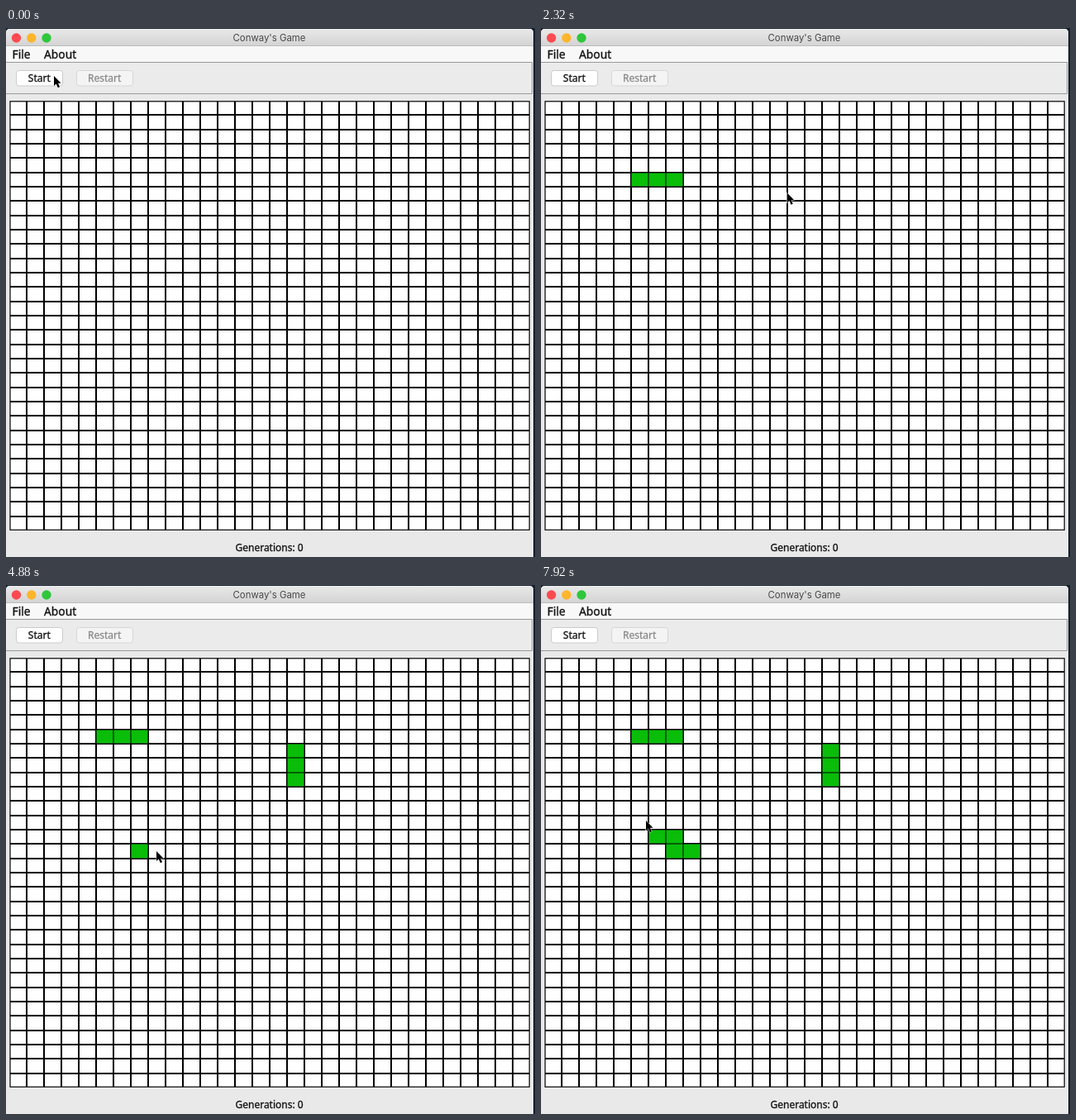
Write an HTML page that moves like this. It is 640 px wide and 640 px high and loops after 8000 ms.

```html
<!DOCTYPE html>
<html lang="en">
<head>
<meta charset="utf-8">
<title>Conway's Game</title>
<style>
html, body { margin: 0; width: 100%; height: 100%; overflow: hidden; background: #e9e9e9; }
svg { display: block; width: 100%; height: 100%; }
text { font: 500 12px "Noto Sans", "Open Sans", sans-serif; fill: #111; stroke: #111; stroke-width: 0.3px; }
.title { font: 400 11.4px Inter, Roboto, sans-serif; fill: #484848; stroke: none; text-anchor: middle; }
.menu { font-size: 13.8px; }
.disabled { fill: #8b8b8b; stroke: #8b8b8b; }
.middle { text-anchor: middle; }
</style>
</head>
<body>
<svg viewBox="0 0 640 640">
  <defs>
    <linearGradient id="bar" x2="0" y2="1">
      <stop stop-color="#e9e9e9"/><stop offset="1" stop-color="#d3d3d3"/>
    </linearGradient>
  </defs>
  <rect width="640" height="640" fill="#17202f"/>
  <path d="M0 640V6Q0 1 5 1H633Q638 1 638 6V640Z" fill="#e9e9e9"/>
  <path d="M0 22V6Q0 1 5 1H633Q638 1 638 6V22Z" fill="url(#bar)"/>
  <rect y="21" width="638" height="1" fill="#bdbdbd"/>
  <circle cx="12.5" cy="12" r="5.7" fill="#fc4b50"/>
  <circle cx="30.8" cy="12" r="5.7" fill="#fdb52c"/>
  <circle cx="49" cy="12" r="5.7" fill="#2fc63c"/>
  <text class="title" x="318.5" y="16.3">Conway's Game</text>

  <rect y="22" width="638" height="19" fill="#f8f8f8"/>
  <text class="menu" x="7.5" y="36.7">File</text>
  <text class="menu" x="46" y="36.7">About</text>

  <path d="M0 41.5H636.5V79.5H0" fill="#ebebeb" stroke="#999"/>
  <rect x="12.5" y="51.5" width="56" height="18.5" rx="3" fill="#fff" stroke="#cbcbcb"/>
  <text class="middle" x="40.3" y="65">Start</text>
  <rect x="85.5" y="51.5" width="68" height="18.5" rx="3" fill="#f4f4f4" stroke="#d6d6d6"/>
  <text class="middle disabled" x="119.2" y="65">Restart</text>

  <rect x="5" y="89" width="628" height="518" fill="#fff"/>
  <path id="grid" stroke="#000" stroke-width="2"/>
  <rect x="5" y="88.8" width="628.2" height="518.4" fill="none" stroke="#000" stroke-width="1.2"/>
  <g id="cells" fill="#09bd09"></g>
  <text class="middle" x="318.6" y="633">Generations: 0</text>
  <path id="cursor" d="M0 0V12L2.7 9.5L4.8 14.2L7 13.2L5 8.7H8.6Z"
        fill="#000" stroke="#fff" stroke-width="1" paint-order="stroke"/>
</svg>
<script>
const LOOP = 8000, STEP = 80, COUNT = 30, HOP = 160;
const lineX = i => 4 + 21 * i;
const lineY = i => Math.round(88 + 52 / 3 * i);

// Runs of clicked cells, each starting at a time and cell and going on in one direction
const runs = [
  { start: 1040, gap: 400, col: 5, row: 5, dx: 1, dy: 0, count: 3 },
  { start: 2880, gap: 160, col: 16, row: 6, dx: 0, dy: 1, count: 3 },
  { start: 4720, gap: 320, col: 7, row: 13, dx: 1, dy: 0, count: 2 },
  { start: 5440, gap: 320, col: 7, row: 12, dx: -1, dy: 0, count: 2 }
];

// Pointer stops away from clicks
const stops = [
  { time: 0, x: 58, y: 58 },
  { time: 240, x: 58, y: 58 },
  { time: 2640, x: 372, y: 208 },
  { time: 3440, x: 355, y: 260 },
  { time: 3760, x: 290, y: 342 },
  { time: 4240, x: 76, y: 284 },
  { time: 6400, x: 140, y: 305 },
  { time: 6800, x: 127, y: 285 },
  { time: LOOP, x: 127, y: 285 }
];

let gridPath = "";
for (let i = 1; i < COUNT; i++) {
  gridPath += `M${lineX(i)} 89V607M5 ${lineY(i)}H633`;
}
document.getElementById("grid").setAttribute("d", gridPath);

const cellGroup = document.getElementById("cells");
const cells = [];
function addCell(time, col, row) {
  const rect = document.createElementNS("http://www.w3.org/2000/svg", "rect");
  const x = lineX(col) + 0.5, y = lineY(row) + 0.5;
  const box = { x, y, width: lineX(col + 1) - x - 0.5, height: lineY(row + 1) - y - 0.5 };
  for (const name in box) rect.setAttribute(name, box[name]);
  cellGroup.append(rect);
  cells.push({ time, rect });
}

// The pointer hops onto each cell and waits there until the click
for (const { start, gap, col, row, dx, dy, count } of runs) {
  for (let i = 0; i < count; i++) {
    const time = start + gap * i, c = col + dx * i, r = row + dy * i;
    const spot = { x: lineX(c) + 10, y: lineY(r) + 9 };
    addCell(time, c, r);
    stops.push({ time: time - gap + HOP, ...spot }, { time, ...spot });
  }
}
stops.sort((a, b) => a.time - b.time);

function pointerAt(t) {
  const next = stops.findIndex(stop => stop.time > t);
  const a = stops[next - 1], b = stops[next];
  const k = (t - a.time) / (b.time - a.time);
  const ease = k * k * (3 - 2 * k);
  return [a.x + (b.x - a.x) * ease, a.y + (b.y - a.y) * ease];
}

const cursor = document.getElementById("cursor");
function draw() {
  const t = Math.floor(performance.now() % LOOP / STEP) * STEP;
  for (const { time, rect } of cells) {
    rect.setAttribute("visibility", t >= time ? "visible" : "hidden");
  }
  cursor.setAttribute("transform", `translate(${pointerAt(t)})`);
  requestAnimationFrame(draw);
}
draw();
</script>
</body>
</html>
```
